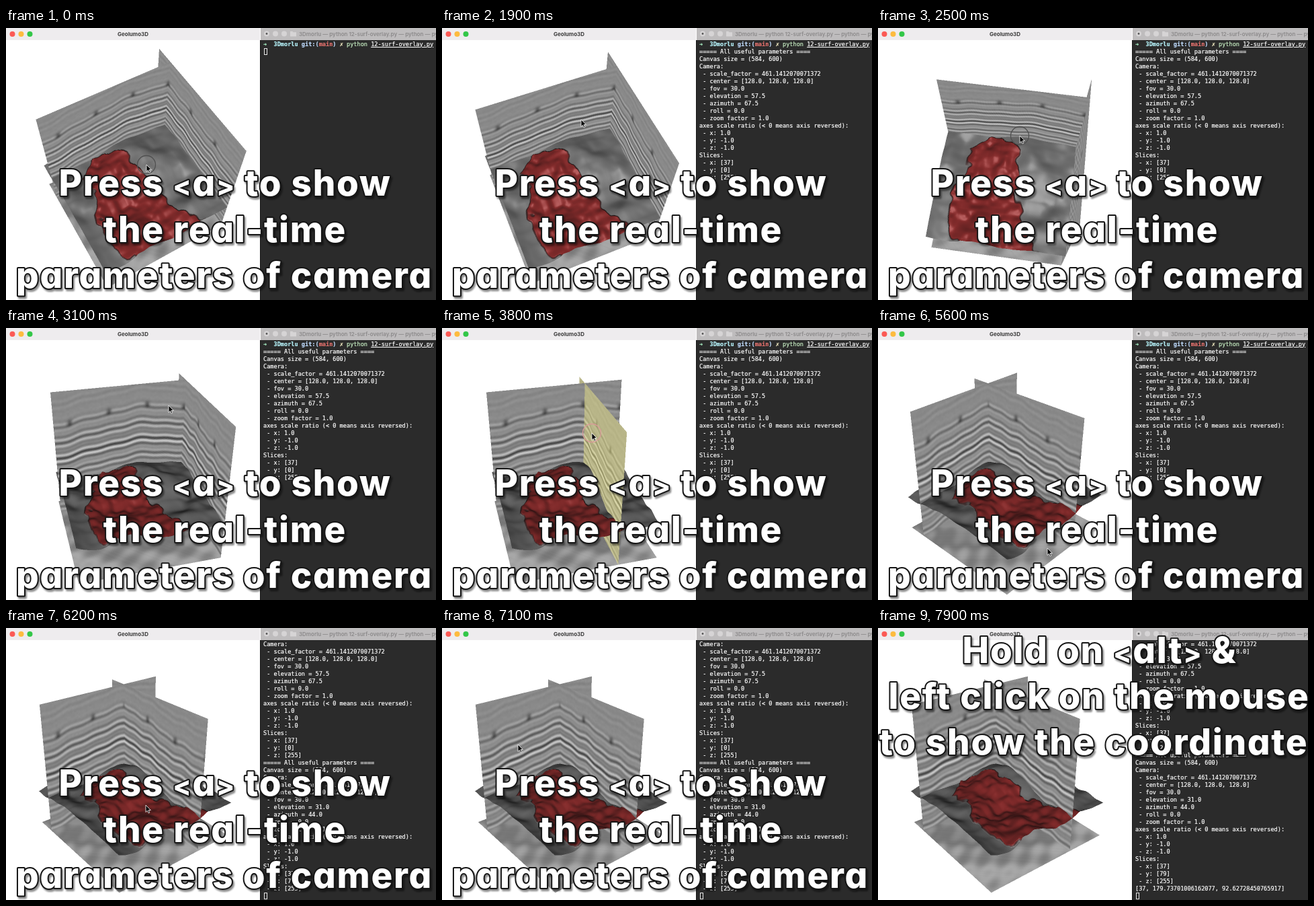
These frames come from a looping animation (640x404 px, 8000 ms). An HTML page with a canvas:

```html
<!DOCTYPE html>
<html lang="en">
<head>
<meta charset="utf-8">
<title>Volume viewer</title>
<style>
html, body { margin: 0; width: 100%; height: 100%; overflow: hidden; background: #fff; }
#stage { position: absolute; left: 0; top: 0; width: 640px; height: 404px; overflow: hidden; }
#stage > * { position: absolute; }
#view { left: 0; top: 18px; width: 378px; height: 386px; }
.bar { top: 0; height: 18px; line-height: 18px; white-space: nowrap; overflow: hidden; font: 700 8px/18px Inter, Roboto, sans-serif; }
#bar1 { left: 0; width: 378px; background: #eeecee; color: #3c3c3c; text-align: center; }
#bar2 { left: 379px; width: 261px; background: #bebcbd; color: #8b898a; font-weight: 600; }
#bar2 span { position: absolute; left: 57px; }
#term { left: 378px; top: 18px; width: 262px; height: 386px; background: #2b2b2b; border-left: 1px solid #161616; box-sizing: border-box; }
#rows { position: absolute; left: 4px; top: .5px; margin: 0; color: #fff; white-space: pre; font: 8.58px/11px "DejaVu Sans Mono", "Liberation Mono", monospace; -webkit-text-stroke: .2px; }
#block { position: absolute; left: 4.5px; width: 3px; height: 8px; border: 1px solid #e6e6e6; }
svg { left: 0; top: 0; }
.cap text { font: 800 53px Inter, "Open Sans", sans-serif; font-feature-settings: "cv11"; letter-spacing: 1.7px; text-anchor: middle; fill: #fff; stroke: #161616; stroke-width: 4px; stroke-linejoin: round; paint-order: stroke; }
.cap tspan { font-size: 40px; }
.cap { filter: drop-shadow(2px 3px 1px rgba(0, 0, 0, .45)); }
</style>
</head>
<body>
<div id="stage">
  <canvas id="view" width="378" height="386"></canvas>
  <div id="term"><pre id="rows"></pre><div id="block"></div></div>
  <div class="bar" id="bar1">Geolumo3D</div>
  <div class="bar" id="bar2"><span>3Dmorlu — python 12-surf-overlay.py — python — python</span></div>
  <svg width="640" height="404" viewBox="0 0 640 404">
    <circle cx="9.5" cy="9" r="4" fill="#fb5a55"/><circle cx="22.5" cy="9" r="4" fill="#fdbb3f"/><circle cx="35.5" cy="9" r="4" fill="#33c748"/>
    <g fill="#d6d4d5"><circle cx="388" cy="8.5" r="4"/><circle cx="401" cy="8.5" r="4"/><circle cx="414" cy="8.5" r="4"/>
      <path d="M423 5h3.5l1 1.2h4.5v6.3h-9z"/></g>
    <circle cx="388" cy="8.5" r="1.4" fill="#555"/>
    <g id="mouse">
      <circle id="ring" r="13.5" fill="none" stroke-width="1.3"/>
      <path d="M0 0V10.5L2.4 8.3 4.2 12 5.8 11.2 4.1 7.6H7.4Z" fill="#000" stroke="#fff" stroke-width=".8"/>
    </g>
    <g class="cap" id="cap1">
      <text x="326" y="249">Press <tspan>&lt;</tspan>a<tspan>&gt;</tspan> to show</text>
      <text x="326" y="318">the real-time</text>
      <text x="325" y="386">parameters of camera</text>
    </g>
    <g class="cap" id="cap2">
      <text x="330" y="52">Hold on <tspan>&lt;</tspan>alt<tspan>&gt;</tspan> &amp;</text>
      <text x="329" y="120">left click on the mouse</text>
      <text x="321" y="188">to show the coordinate</text>
    </g>
  </svg>
</div>
<script>
const LOOP = 8000, STEP = 100;
const $ = id => document.getElementById(id);
const clamp = (v, lo, hi) => Math.max(lo, Math.min(hi, v));
const smooth = (lo, hi, v) => { v = clamp((v - lo) / (hi - lo), 0, 1); return v * v * (3 - 2 * v); };

// Piecewise linear table: rows of [key, ...values]
function track(rows, k) {
  let i = 1;
  while (i < rows.length - 1 && rows[i][0] < k) i++;
  const a = rows[i - 1], b = rows[i], f = clamp((k - a[0]) / (b[0] - a[0]), 0, 1);
  return a.slice(1).map((v, n) => v + (b[n + 1] - v) * f);
}

// time, azimuth, elevation, y slice
const CAMERA = [
  [0, 60, 57.5, 0], [900, 67.5, 57.5, 0], [2000, 67.5, 57.5, 0], [2500, 98, 66, 0], [2600, 98, 66, 0],
  [3100, 75, 30, 0], [3200, 75, 30, 0], [3800, 75, 30, 73], [4000, 75, 30, 79],
  [4200, 75, 30, 79], [5400, 44, 31, 79], [5900, 44, 31, 79], [6200, 52, 28, 79]
];
const MOUSE = [
  [0, 209, 203], [900, 199, 203], [1300, 203, 165], [1800, 207, 136], [1900, 207, 136], [2000, 250, 149],
  [2500, 211, 160], [2600, 211, 160], [3100, 242, 115], [3200, 288, 150], [3800, 223, 156],
  [4000, 218, 157], [4200, 211, 327], [5400, 252, 327], [5700, 252, 327], [5900, 218, 267],
  [6200, 208, 263], [6500, 208, 263], [7100, 113, 173]
];
const PRESSED = [[0, 900], [2000, 3100], [3200, 4000], [4200, 5400], [5900, 6100]];
const inside = ([a, b], t) => t >= a && t < b;
const DRAG = PRESSED[2];

// ---- procedural volume ----
const hash = (i, j) => { const s = Math.sin(i * 127.1 + j * 311.7) * 43758.5453; return s - Math.floor(s); };
function noise(x, y) {
  const i = Math.floor(x), j = Math.floor(y);
  let f = x - i, g = y - j;
  f *= f * (3 - 2 * f); g *= g * (3 - 2 * g);
  const a = hash(i, j), b = hash(i + 1, j), c = hash(i, j + 1), d = hash(i + 1, j + 1);
  return a + (b - a) * f + (c - a) * g + (a - b - c + d) * f * g - .5;
}

function seismic(x, y, z) {
  const p = z + 26 * Math.exp(-((x - 45) ** 2 + (y - 90) ** 2) / 14000)
    + 1.6 * Math.sin(x / 13 + y / 17) + 1.2 * Math.sin(x / 7 - y / 9);
  const amp = .1 + smooth(58, 76, p) * (.9 - .55 * smooth(165, 235, p));
  let v = amp * (.55 * Math.sin(p * .4) + .45 * Math.sin(p * .57 + 1.3)) * (.75 + .25 * Math.sin(p * .057));
  const k = (x + y) % 75 - 37;
  v -= Math.exp(-k * k / 24 - (p - 68) ** 2 / 30);
  return clamp(138 + 68 * v + 5 * noise((x + y) / 4, z / 4), 15, 245);
}
function texture(f) {
  const tex = new Uint8Array(65536);
  for (let v = 0; v < 256; v++) for (let u = 0; u < 256; u++) tex[v * 256 + u] = f(u, v);
  return tex;
}
const XS = 37;
const texX = texture((u, v) => seismic(XS, u, v));
const texZ = texture((u, v) => seismic(u, v, 255));
let texY, texYAt = -1;

// ---- horizon surface with a red patch: x, low y, high y ----
const PATCH = [[-85, -40, 5], [-60, -75, 22], [-20, -73, 26], [20, -85, 28], [60, -102, 40], [95, -100, 55], [128, -72, 74]];
const N = 257;
const height = new Float32Array(N * N), patch = new Float32Array(N * N), normals = new Float32Array(N * N * 3);
for (let v = 0; v < N; v++) for (let u = 0; u < N; u++) {
  const X = u - 128, Y = 128 - v, i = v * N + u;
  const [lo, hi] = track(PATCH, X), wob = 20 * noise(u / 15 + 40, v / 15);
  const m = smooth(0, 4, Math.min(Y - lo, hi - Y, X + 84) + wob);
  patch[i] = m;
  height[i] = -53 + 20 * Math.exp(-((X + 35) ** 2 + (Y - 42) ** 2) / 3600)
    + 20 * noise(u / 55 + 3, v / 55 + 8) + 12 * noise(u / 27, v / 27 + 5)
    + (1 + 6 * m) * noise(u / 12, v / 12) + 4 * m;
}
for (let v = 0; v < N; v++) for (let u = 0; u < N; u++) {
  const h = (a, b) => height[clamp(b, 0, 256) * N + clamp(a, 0, 256)];
  const nx = (h(u - 1, v) - h(u + 1, v)) / 2, ny = (h(u, v + 1) - h(u, v - 1)) / 2;
  const l = Math.hypot(nx, ny, 1);
  normals.set([nx / l, ny / l, 1 / l], (v * N + u) * 3);
}

// ---- software renderer, twice the view size ----
const SS = 2, W = 378 * SS, H = 386 * SS, DIST = 884, SCALE = .82;
const big = document.createElement("canvas");
big.width = W; big.height = H;
const bigCtx = big.getContext("2d"), image = bigCtx.createImageData(W, H);
const pixels = new Uint32Array(image.data.buffer), zbuf = new Float32Array(W * H);
const ctx = $("view").getContext("2d");
const rgb = (r, g, b) => (255 << 24 | b << 16 | g << 8 | r) >>> 0;
let ca, sa, ce, se;

function vertex(X, Y, Z, u, v) {
  const r = X * ca + Y * sa, f = Y * ca - X * sa;
  const q = DIST / (DIST + f * ce - Z * se);
  return {
    x: (189 + SCALE * r * q) * SS, y: (193 - SCALE * (Z * ce + f * se) * q) * SS,
    q, u: u * q, v: v * q
  };
}
function triangle(a, b, c, shade) {
  const bx = b.x - a.x, by = b.y - a.y, cx = c.x - a.x, cy = c.y - a.y, area = bx * cy - by * cx;
  if (Math.abs(area) < 1e-6) return;
  const x0 = Math.max(0, Math.floor(Math.min(a.x, b.x, c.x))), x1 = Math.min(W - 1, Math.ceil(Math.max(a.x, b.x, c.x)));
  const y0 = Math.max(0, Math.floor(Math.min(a.y, b.y, c.y))), y1 = Math.min(H - 1, Math.ceil(Math.max(a.y, b.y, c.y)));
  for (let y = y0; y <= y1; y++) for (let x = x0; x <= x1; x++) {
    const px = x + .5 - a.x, py = y + .5 - a.y;
    const s = (px * cy - py * cx) / area, t = (bx * py - by * px) / area, w = 1 - s - t;
    if (s < 0 || t < 0 || w < 0) continue;
    const q = w * a.q + s * b.q + t * c.q, i = y * W + x;
    if (q <= zbuf[i]) continue;
    zbuf[i] = q;
    pixels[i] = shade((w * a.u + s * b.u + t * c.u) / q, (w * a.v + s * b.v + t * c.v) / q);
  }
}
function quad(a, b, c, d, shade) { triangle(a, b, c, shade); triangle(a, c, d, shade); }
function plane(point, tex, lit) {
  const shade = (u, v) => {
    const g = tex[Math.min(255, v | 0) * 256 + Math.min(255, u | 0)];
    return lit ? rgb(g * .6 + 102, g * .6 + 99, g * .6 + 54) : rgb(g, g, g);
  };
  const corner = (u, v) => vertex(...point(u, v), u, v);
  quad(corner(0, 0), corner(256, 0), corner(256, 256), corner(0, 256), shade);
}
function surface() {
  const vx = sa * ce, vy = -ca * ce, vz = se;
  const shade = (u, v) => {
    const i = (v | 0) * N + (u | 0), n = i * 3;
    const d = Math.max(0, normals[n] * vx + normals[n + 1] * vy + normals[n + 2] * vz);
    const spec = d ** 30, m = patch[i], g = 32 + 88 * d + 45 * spec;
    const red = 48 + 92 * d + 45 * spec, low = 20 + 26 * d + 50 * spec;
    const edge = 1 - 1.6 * m * (1 - m);
    return rgb((g + (red - g) * m) * edge, (g + (low - g) * m) * edge, (g + (low - g) * m) * edge);
  };
  const C = 4, M = 256 / C, grid = [];
  for (let j = 0; j <= M; j++) for (let i = 0; i <= M; i++) {
    const u = i * C, v = j * C;
    grid.push(vertex(u - 128, 128 - v, height[v * N + u], u, v));
  }
  for (let j = 0; j < M; j++) for (let i = 0; i < M; i++) {
    const k = j * (M + 1) + i;
    quad(grid[k], grid[k + 1], grid[k + M + 2], grid[k + M + 1], shade);
  }
}

let lastView = "";
function drawView(t) {
  const [az, el, ys] = track(CAMERA, t), lit = inside(DRAG, t);
  const key = [az, el, ys, lit].join();
  if (key === lastView) return;
  lastView = key;
  const A = az * Math.PI / 180, E = el * Math.PI / 180;
  ca = Math.cos(A); sa = Math.sin(A); ce = Math.cos(E); se = Math.sin(E);
  if (texYAt !== ys) { texY = texture((u, v) => seismic(u, ys, v)); texYAt = ys; }
  pixels.fill(0xffffffff);
  zbuf.fill(0);
  plane((u, v) => [XS - 128, 128 - u, 128 - v], texX);
  plane((u, v) => [u - 128, 128 - ys, 128 - v], texY, lit);
  plane((u, v) => [u - 128, 128 - v, -128], texZ);
  surface();
  bigCtx.putImageData(image, 0, 0);
  ctx.drawImage(big, 0, 0, 378, 386);
}

// ---- terminal ----
const ink = (color, text, bold) => `<span style="color:${color}${bold ? ";font-weight:700" : ""}">${text}</span>`;
const prompt = ink("#a5ecc0", "➜", 1) + "  " + ink("#b5f1f8", "3Dmorlu", 1) + " " + ink("#bcd8fa", "git:(", 1)
  + ink("#e0706c", "main", 1) + ink("#bcd8fa", ")", 1) + " " + ink("#f4eec4", "✗", 1) + " "
  + ink("#c8f0c4", "python") + " <u>12-surf-overlay.py</u>";
const report = (el, az, y) => [
  "===== All useful parameters ====", "Canvas size = (584, 600)", "Camera:",
  " - scale_factor = 461.1412070071372", " - center = [128.0, 128.0, 128.0]", " - fov = 30.0",
  ` - elevation = ${el}`, ` - azimuth = ${az}`, " - roll = 0.0", " - zoom factor = 1.0",
  "axes scale ratio (&lt; 0 means axis reversed):", " - x: 1.0", " - y: -1.0", " - z: -1.0",
  "Slices:", " - x: [37]", ` - y: [${y}]`, " - z: [255]"
];
const PRINTS = [
  [0, [prompt]], [1300, report("57.5", "67.5", 0)], [5800, report("31.0", "44.0", 79)],
  [7900, ["[37, 179.73701006162077, 92.62728450765917]"]]
];
let lastCount = -1;
function drawTerminal(t) {
  const done = PRINTS.filter(p => p[0] <= t);
  if (done.length === lastCount) return;
  lastCount = done.length;
  const lines = done.flatMap(p => p[1]).slice(-34);
  $("rows").innerHTML = lines.join("\n");
  $("block").style.top = lines.length * 11 + 1 + "px";
}

function drawOverlay(t) {
  const [x, y] = track(MOUSE, t);
  $("mouse").setAttribute("transform", `translate(${x} ${y})`);
  $("ring").style.display = PRESSED.some(p => inside(p, t)) ? "" : "none";
  $("ring").setAttribute("stroke", inside(DRAG, t) ? "#d99a98" : "#505050");
  const fade = clamp((t - 7200) / 400, 0, 1);
  $("cap1").style.opacity = 1 - fade;
  $("cap2").style.opacity = fade;
}

const start = performance.now();
let last = -1;
function tick(now) {
  const t = Math.floor(Math.max(0, now - start) % LOOP / STEP) * STEP;
  if (t !== last) {
    last = t;
    drawView(t);
    drawTerminal(t);
    drawOverlay(t);
  }
  requestAnimationFrame(tick);
}
tick(start);
</script>
</body>
</html>
```
